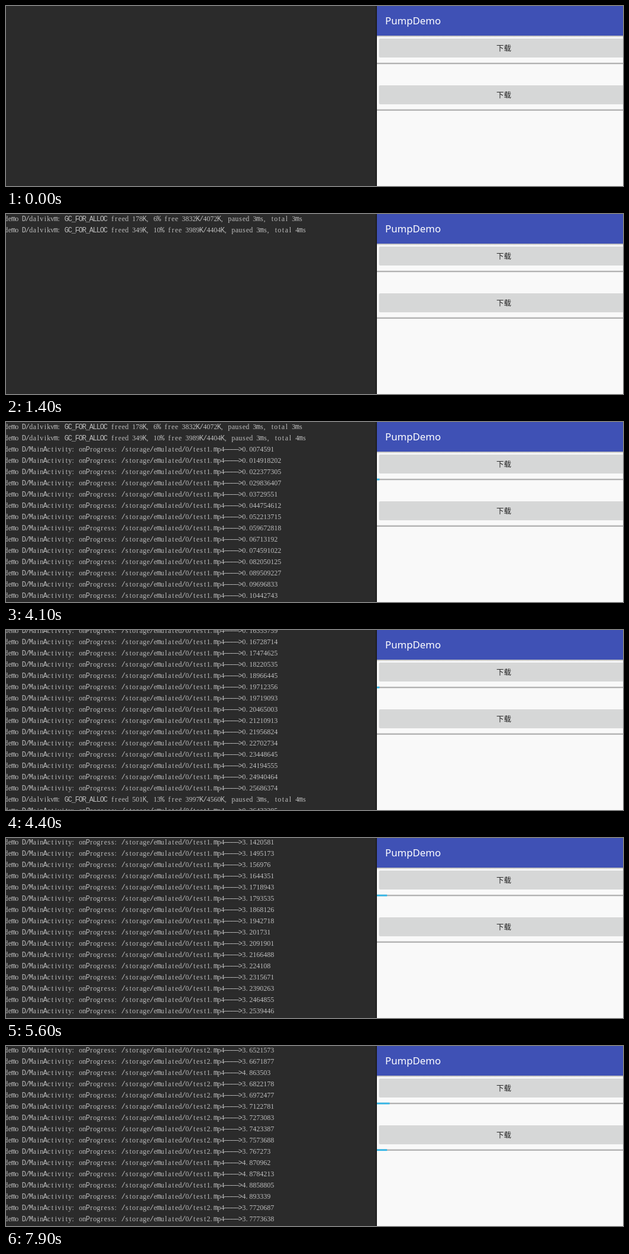
Write an HTML page with a canvas that moves like this. It is 1043 px wide and 304 px high and loops after 8 s.

```html
<!DOCTYPE html>
<html lang="zh-CN">
<head>
<meta charset="utf-8">
<style>
html, body { margin: 0; width: 100%; height: 100%; overflow: hidden; background: #2b2b2b; }
canvas { display: block; }
</style>
</head>
<body>
<canvas id="stage" width="1043" height="304"></canvas>
<script>
const ctx = document.getElementById('stage').getContext('2d');
const LOOP = 8000, LINE = 19, CELL = 6, APP = 627;
const CHUNK = { 1: 0.0074591025, 2: 0.0150302 };   // percent per log line
const SERIF = '12px "Liberation Serif", serif';
const MONO = '12px "Liberation Mono", monospace';

const gc = (freed, heap, total) =>
  `demo D/dalvikvm: GC_FOR_ALLOC freed ${freed}K, ${heap}, paused 3ms, total ${total}ms`;
const log = (file, value) =>
  `demo D/MainActivity: onProgress: /storage/emulated/0/test${file}.mp4————>${value}`;
const lines = (file, values) => values.split(' ').map(v => log(file, v));
const format = v => String(+v.toFixed(v < 0.1 ? 9 : v < 1 ? 8 : 7));
const run = (file, first, count = 16) =>
  Array.from({ length: count }, (_, i) => log(file, format(first + i * CHUNK[file])));

const idle = [gc(178, '6% free 3832K/4072K', 3), gc(349, '10% free 3989K/4404K', 4)];
const started = count => [...idle, ...run(1, 0.0074591, count)];

// [time, baseline of the first line, lines]
const screens = [
  [0, 12, []],
  [500, 12, idle.slice(0, 1)],
  [1400, 12, idle],
  [3900, 12, started(4)],
  [4000, 12, started(9)],
  [4100, 12, started(14)],
  [4300, 5, run(1, 0.08205013, 17)],
  [4400, 5, [
    ...lines(1, '0.16355759 0.16728714 0.17474625 0.18220535 0.18966445 0.19712356 0.19719093 0.20465003'),
    ...lines(1, '0.21210913 0.21956824 0.22702734 0.23448645 0.24194555 0.24940464 0.25686374'),
    gc(501, '13% free 3997K/4560K', 4), log(1, '0.26432285')]],
  [4500, 11, run(1, 0.32399568)],
  [4600, 11, run(1, 0.55522786)],
  [4700, 11, run(1, 0.82354186)],
  [4900, 11, run(1, 1.2114151)],
  [5100, 11, run(1, 1.5769112)],
  [5200, 11, run(1, 1.8454389)],
  [5400, 11, run(1, 2.5391354)],
  [5500, 11, run(1, 2.8449586)],
  [5600, 11, [
    ...lines(1, '3.1420581 3.1495173 3.156976 3.1644351 3.1718943 3.1793535 3.1868126 3.1942718'),
    ...lines(1, '3.201731 3.2091901 3.2166488 3.224108 3.2315671 3.2390263 3.2464855 3.2539446')]],
  [5800, 11, run(1, 3.9328165)],
  [6000, 11, run(1, 4.3407104)],
  [6700, 11, [
    ...run(1, 4.4457936, 5), ...run(2, 0.015030194, 6),
    ...run(1, 4.4830891, 3), ...run(2, 0.10521136, 2)]],
  [6900, 11, [
    ...lines(1, '4.512925 4.5203843 4.527843 4.535302'),
    ...lines(2, '0.26237577 0.27740598 0.29243618 0.29414618'),
    ...lines(1, '4.5427613 4.5502205 4.5576797 4.565139 4.572598 4.580057 4.587516 4.594975')]],
  [7100, 11, run(2, 0.71435962)],
  [7400, 11, run(2, 1.6947518)],
  [7500, 11, run(2, 2.1463527)],
  [7700, 11, run(2, 2.8812494)],
  [7900, 11, [
    ...lines(2, '3.6521573 3.6671877'), log(1, '4.863503'),
    ...lines(2, '3.6822178 3.6972477 3.7122781 3.7273083 3.7423387 3.7573688 3.767273'),
    ...lines(1, '4.870962 4.8784213 4.8858805 4.893339'),
    ...lines(2, '3.7720687 3.7773638')]],
];

// Each task: top of its button, middle of its bar, press time,
// times when the bar gains one percent
const tasks = [
  { top: 55, bar: 97, press: 500, steps: [3700, 4700, 5200, 5500, 5800] },
  { top: 134, bar: 175.7, press: 3900, steps: [6500, 7400, 7500, 7700] },
];

function box(color, x, y, w, h) {
  ctx.fillStyle = color;
  ctx.fillRect(x, y, w, h);
}

function text(str, x, y, font, color, align = 'left') {
  ctx.font = font;
  ctx.fillStyle = color;
  ctx.textAlign = align;
  ctx.fillText(str, x, y);
}

// One character per cell: narrow ones in serif, wide ones in mono, points at the left
function drawRow(row, y) {
  [...row].forEach((char, i) => {
    const x = i * CELL - 3;
    if ('.,:'.includes(char)) text(char, x + 0.5, y, SERIF, '#bbbbbb');
    else text(char, x + 3.3, y, /[a-ln-z0-9]/.test(char) ? SERIF : MONO, '#bbbbbb', 'center');
  });
}

function drawConsole(t) {
  box('#2b2b2b', 0, 0, APP, 304);
  const [, base, rows] = screens.findLast(s => s[0] <= t);
  rows.forEach((row, i) => drawRow(row, base + i * LINE));
  box('#1d1d1d', 625, 0, 2, 304);
}

function drawTask({ top, bar, press, steps }, t) {
  const since = t - press;
  ctx.fillStyle = since < 0 || since >= 200 ? '#d6d7d7' : since < 100 ? '#cbcccc' : '#d1d2d2';
  ctx.beginPath();
  ctx.roundRect(630.5, top, 422, 32, 2);
  ctx.fill();
  text('下载', 841.5, top + 21, '12.5px "Noto Sans CJK SC", "Noto Sans CJK", sans-serif', '#222222', 'center');

  const percent = steps.filter(s => s <= t).length;
  box('#b2b2b2', APP, bar - 1.2, 416, 2.4);
  box('#33b5e5', APP, bar - 1.4, percent * 4.29, 2.8);
}

function drawApp(t) {
  box('#f9f9f9', APP, 0, 416, 304);
  const shade = ctx.createLinearGradient(0, 50, 0, 53);
  shade.addColorStop(0, 'rgba(0,0,0,.3)');
  shade.addColorStop(1, 'rgba(0,0,0,0)');
  box(shade, APP, 50, 416, 3);
  box('#3f51b5', APP, 0, 416, 50);
  text('PumpDemo', 641, 31, '16.8px "Noto Sans", sans-serif', '#ffffff');
  tasks.forEach(task => drawTask(task, t));
}

function frame(now) {
  const t = now % LOOP;
  drawConsole(t);
  drawApp(t);
  requestAnimationFrame(frame);
}
requestAnimationFrame(frame);
</script>
</body>
</html>
```
